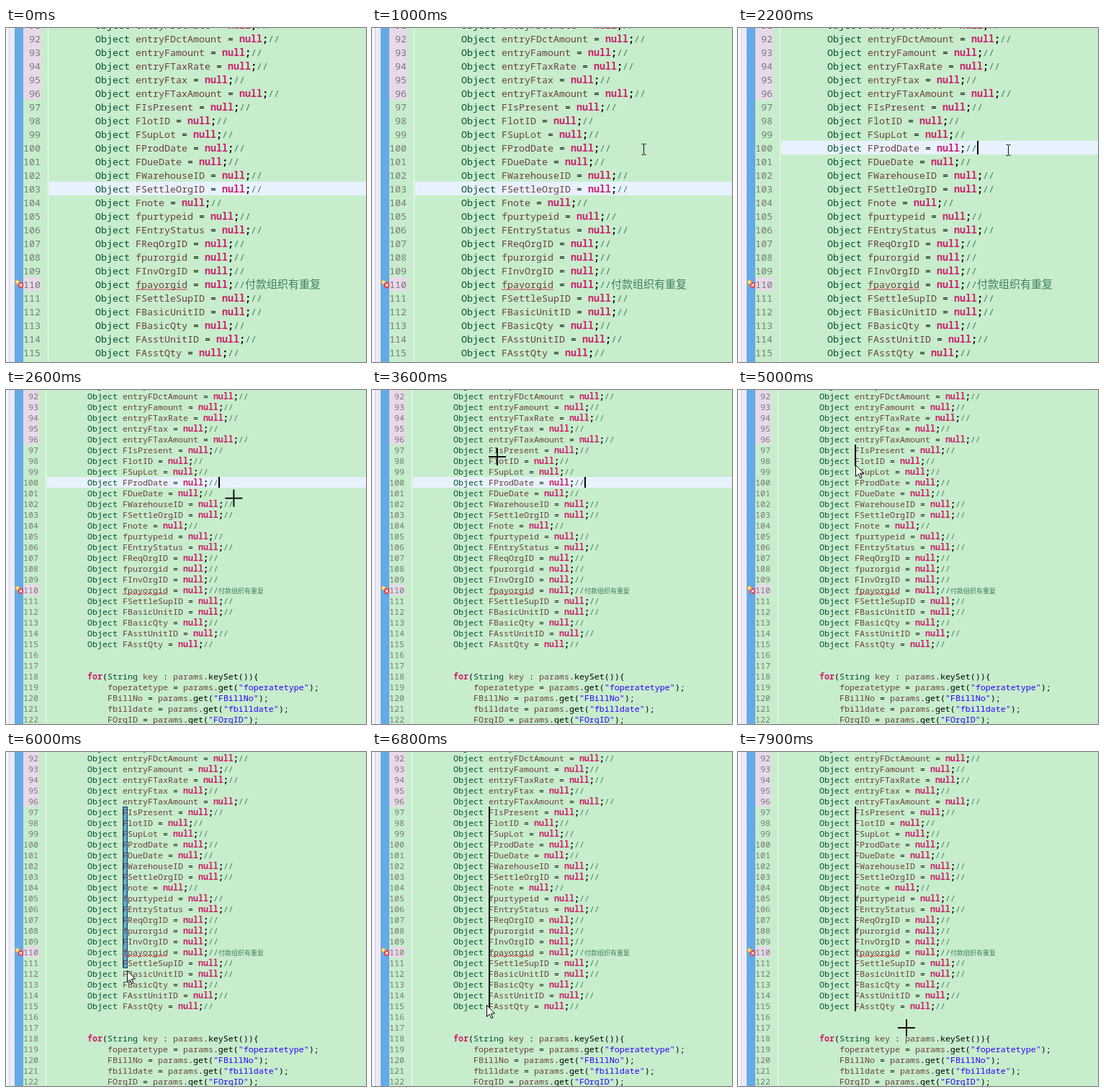
An HTML page that plays this animation: 500x465 px, repeating every 8 s.

```html
<!DOCTYPE html>
<html lang="zh">
<head>
<meta charset="utf-8">
<title>Block selection</title>
<style>
html, body { margin: 0; width: 100%; height: 100%; overflow: hidden; }
#stage { position: relative; width: 500px; height: 465px; overflow: hidden; background: #c7edcc; }
#stage div, #stage svg { position: absolute; }
#stage svg { overflow: visible; }

#margin { left: 0; top: 0; width: 12px; height: 100%;
  background: linear-gradient(90deg, #f6f8fd 4px, #c6d0ea 4px 5px, #f0e9f6 5px 11px, #e6eaf6 11px); }
#ruler { left: 12px; top: 0; width: 12px; height: 100%;
  background: repeating-conic-gradient(#0078d7 0 25%, #c9dcf5 0 50%) 0 0 / 2px 2px; }

/* --h: line height, --x: code column, --n: right edge of the line numbers, --drop: baseline shift */
.page { inset: 0; white-space: pre; font-family: "Noto Sans Mono", "DejaVu Sans Mono", monospace; }
#normal { --h: 19px; --x: 124px; --n: 48px; --seam: 58px; --drop: 2px; --cjk: 15px; font-size: 13.333px; }
#column { --h: 15px; --x: 113px; --n: 45px; --seam: 55px; --drop: 0px; --cjk: 9px; font-size: 11.667px; opacity: 0; }
.seam { left: var(--seam); top: 0; width: 1px; height: 100%; background: #f6fbf7; }
.num, .code { height: var(--h); line-height: calc(var(--h) + var(--drop)); }
.num { left: 24px; width: calc(var(--n) - 24px); text-align: right; color: #787878; }
.changed { background: #e8d9e8; padding-right: 1px; }
.code { left: var(--x); color: #000; }
.type { color: #005032; }
.name { color: #6a3e3e; }
.word { color: #cc1f6e; font-weight: 700; }
.end { font-weight: 700; }
.text { color: #2a00ff; }
.note { color: #3f7f5f; }
.cjk { font: var(--cjk)/0 "Noto Sans CJK SC", "Noto Sans CJK", sans-serif; }
.row { right: 0; height: var(--h); background: #e8f2fe; }
.caret { width: 2px; background: #000; }

#normal .row { left: 60px; top: 214px; }
#normal .caret { left: 332px; top: 157px; height: 19px; }
#column .row { left: 57px; top: 121px; }
#column .caret { left: 295px; top: 121px; height: 15px; }
#sel { left: 162px; top: 76px; width: 7px; height: 15px; box-sizing: border-box;
  background: #62a8d0; border: 1px solid #123a5c; }

#tip { left: 162px; top: 96px; width: 400px; height: 104px; box-sizing: border-box;
  background: #ffffe1; border: 1px solid #555; color: #000;
  font: 700 12.8px/15px "Noto Sans", "Open Sans", sans-serif; white-space: pre;
  box-shadow: 1px 1px 2px #0006; }
#tip p { position: absolute; left: 24px; top: 2px; margin: 0; }
#tip hr { position: absolute; left: 0; right: 0; top: 84px; margin: 0; border: 0; border-top: 1px solid #a0a0a0; }
#tip i { position: absolute; left: 7px; top: 5px; width: 10px; height: 10px; border-radius: 50%;
  background: #8c8c8c; color: #fff; font: 700 8px/10px "Noto Sans", sans-serif; text-align: center; }
.pointer { left: 0; top: 0; width: 1px; height: 1px; }

#stage .act { animation: 8s step-end infinite; }
#stage #normal { animation-name: normal; }
#stage #column { animation-name: column; }
#stage #normal .row { animation-name: row-normal; }
#stage #normal .caret { animation-name: caret-normal; }
#stage #column .row { animation-name: row-column; }
#stage #column .caret { animation-name: caret-column, grow; }
#stage #sel { animation-name: sel, grow; }
#stage #tip { animation-name: tip; }
#stage #ibeam { animation-name: ibeam; }
#stage #cross { animation-name: cross; }
#stage #arrow { animation-name: arrow; }

@keyframes normal { 0% { opacity: 1; } 30%, 100% { opacity: 0; } }
@keyframes column { 0% { opacity: 0; } 30%, 100% { opacity: 1; } }
@keyframes row-normal { 0% { top: 214px; } 13.75%, 100% { top: 157px; } }
@keyframes row-column {
  0% { top: 121px; opacity: 1; }
  58.75% { top: 76px; opacity: 1; }
  61.25%, 100% { top: 76px; opacity: 0; }
}
@keyframes caret-normal {
  0% { opacity: 0; } 13.75% { opacity: 1; } 20% { opacity: 0; } 26.25%, 100% { opacity: 1; }
}
@keyframes caret-column {
  0% { left: 295px; top: 121px; opacity: 1; }
  36.25% { left: 295px; top: 121px; opacity: 0; }
  42.5% { left: 295px; top: 121px; opacity: 1; }
  48.75% { left: 295px; top: 121px; opacity: 0; }
  58.75% { left: 162px; top: 76px; opacity: 1; }
  68.75% { left: 162px; top: 76px; opacity: 0; }
  80%, 100% { left: 162px; top: 76px; opacity: 1; }
}
@keyframes grow {
  0% { height: 15px; }
  61.25% { height: 30px; }
  62.5% { height: 30px; animation-timing-function: steps(13); }
  75% { height: 225px; animation-timing-function: steps(4); }
  81.25%, 100% { height: 285px; }
}
@keyframes sel { 0% { opacity: 0; } 68.75% { opacity: 1; } 80%, 100% { opacity: 0; } }
@keyframes tip { 0% { opacity: 0; } 53.75% { opacity: 1; } 57.5%, 100% { opacity: 0; } }
@keyframes ibeam {
  0% { opacity: 0; transform: translate(234px, 218px); }
  2.5% { opacity: 1; transform: translate(234px, 218px); animation-timing-function: steps(8); }
  12.5% { opacity: 1; transform: translate(377px, 169px); }
  17.5% { opacity: 1; transform: translate(376px, 169px); }
  27.5% { opacity: 1; transform: translate(375px, 170px); }
  30%, 100% { opacity: 0; transform: translate(375px, 170px); }
}
@keyframes cross {
  0% { opacity: 0; transform: translate(372px, 170px); }
  30% { opacity: 1; transform: translate(372px, 170px); animation-timing-function: steps(6); }
  37.5% { opacity: 1; transform: translate(205px, 112px); }
  38.75% { opacity: 1; transform: translate(205px, 112px); animation-timing-function: steps(5); }
  45% { opacity: 1; transform: translate(174px, 93px); animation-timing-function: steps(3); }
  48.75% { opacity: 1; transform: translate(160px, 85px); }
  53.75% { opacity: 1; transform: translate(163px, 85px); }
  58.75% { opacity: 0; transform: translate(163px, 85px); }
  90% { opacity: 1; transform: translate(159px, 354px); animation-timing-function: steps(4); }
  95% { opacity: 1; transform: translate(240px, 392px); animation-timing-function: steps(3); }
  98.75%, 100% { opacity: 1; transform: translate(234px, 384px); }
}
@keyframes arrow {
  0% { opacity: 0; transform: translate(163px, 85px); }
  58.75% { opacity: 1; transform: translate(163px, 85px); }
  61.25% { opacity: 1; transform: translate(163px, 95px); }
  62.5% { opacity: 1; transform: translate(163px, 104px); animation-timing-function: steps(7); }
  71.25% { opacity: 1; transform: translate(167px, 258px); animation-timing-function: steps(3); }
  75% { opacity: 1; transform: translate(168px, 304px); animation-timing-function: steps(6); }
  82.5% { opacity: 1; transform: translate(160px, 344px); }
  83.75% { opacity: 1; transform: translate(159px, 352px); }
  90%, 100% { opacity: 0; transform: translate(159px, 352px); }
}
</style>
</head>
<body>
<div id="stage">
  <div id="margin"></div>
  <div id="ruler"></div>
  <div id="normal" class="page act"><div class="seam"></div><div class="row act"></div></div>
  <div id="column" class="page act"><div class="seam"></div><div class="row act"></div><div id="sel" class="act"></div></div>
  <div id="tip" class="act"><i>L</i><p>Object FIsPresent - dw.en.subunitk.outer.lib.fetchover
(Map&lt;String, Object&gt;)</p><hr></div>
  <svg id="ibeam" class="pointer act"><path d="M-2.5 -7.5H0M1 -7.5H3.5M.5 -7V7M-2.5 7.5H0M1 7.5H3.5" fill="none" stroke="#111"/></svg>
  <svg id="cross" class="pointer act"><path d="M-12 0H12M0 -12V12" stroke="#111" stroke-width="2"/></svg>
  <svg id="arrow" class="pointer act"><path d="M.5 .5V16.5L4.2 13 6.7 18.7 9 17.7 6.5 12H11.5Z" fill="#fff" stroke="#000"/></svg>
</div>
<script>
const FIRST = 91, CHANGED = [91, 92, 93, 94, 95, 96, 110];
const fields = `entryFDctRate entryFDctAmount entryFamount entryFTaxRate entryFtax entryFTaxAmount
  FIsPresent FlotID FSupLot FProdDate FDueDate FWarehouseID FSettleOrgID Fnote fpurtypeid FEntryStatus
  FReqOrgID fpurorgid FInvOrgID fpayorgid FSettleSupID FBasicUnitID FBasicQty FAsstUnitID FAsstQty`.split(/\s+/);
const keys = ['foperatetype', 'FBillNo', 'fbilldate', 'FOrgID'];

const lines = [
  ...fields.map(f => `Object ${f} = null;//${f === 'fpayorgid' ? '付款组织有重复' : ''}`),
  '', '',
  'for(String key : params.keySet()){',
  ...keys.map(k => `    ${k} = params.get("${k}");`)
];

const KINDS = ['text', 'note', 'word', 'type', 'name', 'end'];
const TOKEN = /("[^"]*")|(\/\/.*)|\b(null|for)\b|\b(Object|String)\b|\b([fF]\w+|entry\w+|key|params)\b|((?<=null);)/g;
const paint = code => code.replace(TOKEN, (token, ...groups) => {
  const kind = KINDS[groups.slice(0, KINDS.length).findIndex(Boolean)];
  const body = token.replace(/[^\x00-\x7f]+/, '<span class="cjk">$&</span>');
  return `<span class="${kind}">${body}</span>`;
});

// Error marker in the ruler and the wavy line below the variable.
function problem(top, height, left, width) {
  const mid = top + height / 2;
  let wave = '';
  for (let x = 0; x <= width; x += 2) wave += `${left + x},${top + height - (x % 4 ? 1 : 3)} `;
  return `<svg class="pointer">
    <polyline points="${wave}" fill="none" stroke="#d8324a"/>
    <circle cx="16" cy="${mid - 2.5}" r="3" fill="#fbe08a" stroke="#d9a441"/>
    <rect x="17" y="${mid - 2}" width="7" height="7" rx="1" fill="#dc2f36"/>
    <path d="M18.5 ${mid - .5}l4 4m0 -4l-4 4" stroke="#fff" stroke-width="1.2"/></svg>`;
}

function fill(id, top100, height, left, advance) {
  const top = n => top100 + (n - 100) * height;
  const html = lines.map((code, i) => {
    const n = FIRST + i, place = `style="top:${top(n)}px"`;
    return `<div class="num${CHANGED.includes(n) ? ' changed' : ''}" ${place}>${n}</div>` +
      `<div class="code" ${place}>${paint(code)}</div>`;
  }).join('');
  document.getElementById(id).insertAdjacentHTML('beforeend', html +
    problem(top(110), height, left + 7 * advance, 9 * advance) + '<div class="caret act"></div>');
}

fill('normal', 157, 19, 124, 8);
fill('column', 121, 15, 113, 7);
</script>
</body>
</html>
```
